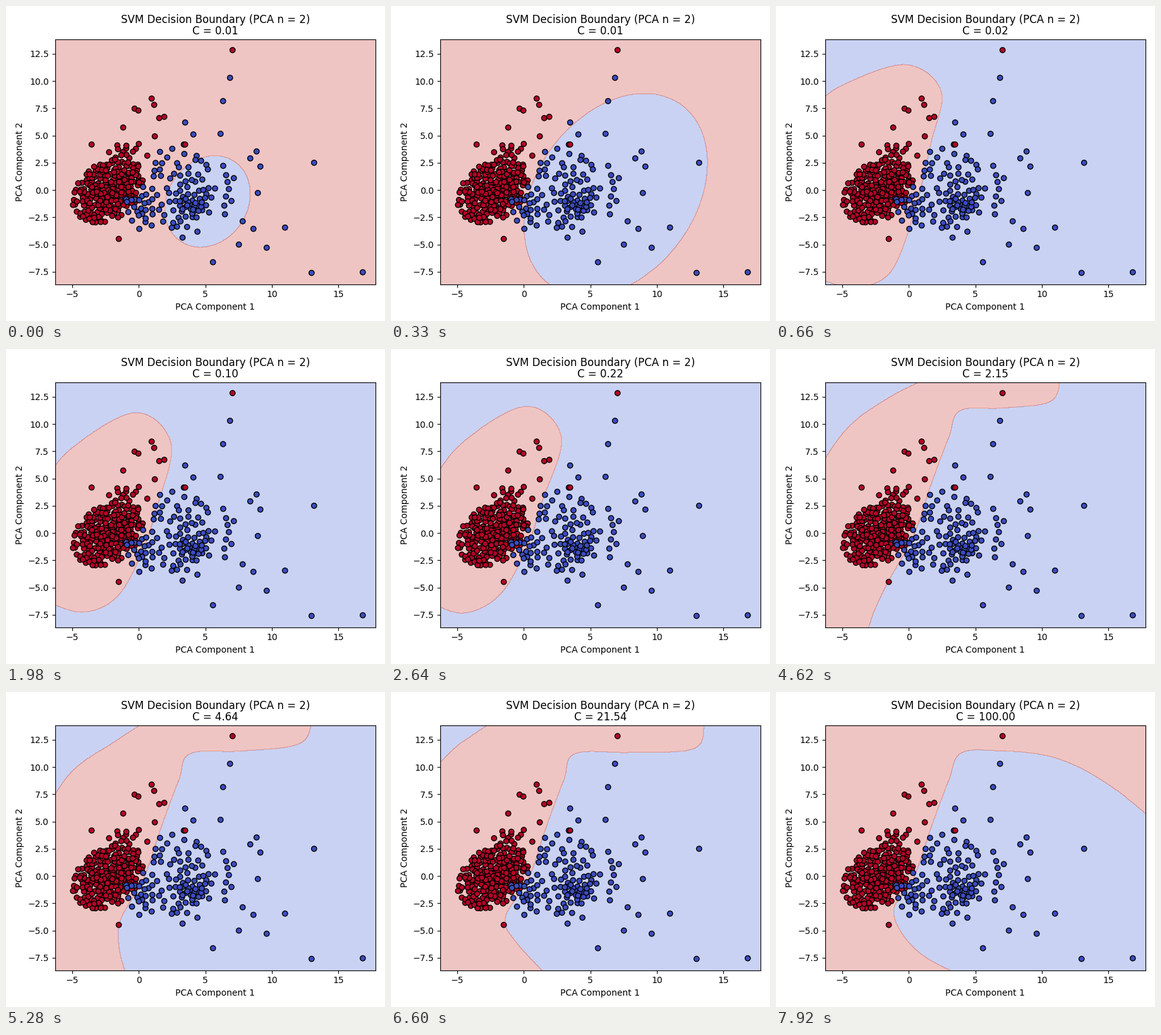
These frames come from a looping animation (600x500 px, 8.25 s). A matplotlib script:

```python
import numpy as np
import matplotlib.pyplot as plt
from matplotlib.animation import FuncAnimation
from matplotlib.path import Path

FRAMES, INTERVAL = 25, 330
RED, BLUE = "#b40426", "#3b4cc0"
XLIM, YLIM = (-6.29, 17.79), (-8.65, 13.80)
X0, Y0, SX, SY = 210.7, 292.3, 21.05, 17.32  # stage pixels <-> axis units
HEADING = "SVM Decision Boundary (PCA n = 2)\nC = {:.2f}"

rng = np.random.default_rng(11)


# ---- points -------------------------------------------------------------

def scatter_cloud(pts, n, center, radius, lean=0.0, tries=4):
    """Add n points of a cut-off normal cloud, each the loneliest of a few."""
    for _ in range(n):
        options = []
        while len(options) < tries:
            u, v = rng.normal(scale=0.5, size=2)
            if u * u + v * v < 1:
                options.append((center[0] + radius[0] * u,
                                center[1] + radius[1] * (v + lean * u)))
        placed = np.array(pts)
        pts.append(max(options, key=lambda p: np.hypot(*(placed - p).T).min()))


red = [(359, 70), (231, 147), (235, 157), (204, 163), (210, 166), (243, 178),
       (251, 176), (186, 193), (236, 207), (284, 220), (136, 220), (179, 370)]
scatter_cloud(red, 14, (195, 232), (42, 14))
scatter_cloud(red, 225, (162, 293), (56, 50), lean=-0.35)

blue = [(355, 114), (344, 151), (284, 185), (340, 203), (297, 204), (387, 242),
        (397, 231), (403, 255), (488, 249), (399, 297), (375, 342), (392, 354),
        (442, 352), (369, 379), (413, 384), (328, 407), (484, 424), (565, 423)]
scatter_cloud(blue, 72, (278, 292), (56, 80))
scatter_cloud(blue, 20, (297, 316), (24, 20))
scatter_cloud(blue, 22, (216, 322), (30, 38))
scatter_cloud(blue, 9, (350, 295), (16, 45))

# ---- decision regions ---------------------------------------------------

xs, ys = np.linspace(*XLIM, 500), np.linspace(*YLIM, 500)
GX, GY = np.meshgrid(X0 + xs * SX, Y0 - ys * SY)
GRID = np.column_stack([GX.ravel(), GY.ravel()])

# Red lobe, from its upper left end clockwise to the lower left.
LOBE = {
    2: [(50, 167), (105, 126), (205, 93), (262, 135), (246, 218), (217, 336),
        (180, 425), (120, 446), (50, 428)],
    6: [(50, 225), (105, 157), (205, 101), (262, 150), (240, 250), (213, 330),
        (175, 395), (120, 418), (50, 396)],
    11: [(50, 250), (120, 142), (225, 76), (283, 125), (240, 230), (218, 298),
         (170, 383), (106, 422), (50, 400)],
}
# Red band: four points upper left, three at the right end, three at the foot.
BAND = {
    12: [(50, 243), (125, 133), (190, 76), (290, 46), (372, 38), (371, 84),
         (330, 94), (171, 385), (106, 425), (40, 408)],
    16: [(50, 210), (103, 128), (172, 79), (235, 38), (488, 38), (465, 82),
         (370, 94), (182, 362), (180, 408), (194, 460)],
    20: [(50, 142), (98, 92), (130, 68), (175, 38), (498, 38), (482, 89),
         (380, 96), (182, 357), (196, 394), (258, 462)],
}
SEAM = [(292, 98), (274, 140), (246, 216), (218, 297)]
BASIN = ([(620, 222), (525, 146), (440, 104), (345, 93)] + SEAM
         + [(187, 350), (225, 412), (312, 460)])


def spline(pts, n=16):
    """Open Catmull-Rom curve."""
    p = np.asarray(pts, float)
    p = np.vstack([2 * p[0] - p[1], p, 2 * p[-1] - p[-2]])
    t = np.linspace(0, 1, n)[:, None]
    return np.vstack([
        0.5 * (2 * b + (c - a) * t + (2 * a - 5 * b + 4 * c - d) * t ** 2
               + (3 * b - a - 3 * c + d) * t ** 3)
        for a, b, c, d in zip(p, p[1:], p[2:], p[3:])])


def tween(keys, i):
    """Key points at step i; the first stretch slows down towards its end."""
    steps = sorted(keys)
    j = int(np.clip(np.searchsorted(steps, i, "right") - 1, 0, len(steps) - 2))
    a, b = steps[j], steps[j + 1]
    t = (i - a) / (b - a)
    if j == 0:
        t = 1 - (1 - t) ** 1.7
    p, q = np.array(keys[a], float), np.array(keys[b], float)
    return p + (q - p) * t


def bubble(t):
    """Blue egg that grows with t."""
    a = np.linspace(0, 2 * np.pi, 200)
    x = 319.5 + 36.5 * t + (67.5 + 77.5 * t) * np.cos(a)
    y = 310.5 - 10.5 * t - (72.5 + 88.5 * t) * np.sin(a + 0.17 + 0.15 * t)
    return np.column_stack([x, y])


def band(i):
    p = tween(BAND, i)
    right = np.vstack([p[4:7], SEAM, p[7:]])
    return np.vstack([spline(p[:4]), spline(right), [(40, p[-1, 1])]])


def basin(t):
    """Blue basin whose right rim sinks and whose foot spreads with t."""
    p = np.array(BASIN, float)
    x, y = p.T
    rim = 0.00104 * np.maximum(x - 345, 0) ** 2
    foot = 0.25 * np.maximum(y - 350, 0) * (x < 345)
    p -= (1 - t) * np.column_stack([foot, rim])
    return np.vstack([spline(p), [(620, 462)]])


def red_mask(i):
    if i < 2:
        outline, holds_red = bubble(i), False
    elif i < 12:
        outline, holds_red = spline(tween(LOBE, i)), True
    elif i < 22:
        outline, holds_red = band(i), True
    else:
        outline, holds_red = basin((i - 22) / 2), False
    inside = Path(outline).contains_points(GRID).reshape(GX.shape)
    return inside == holds_red


# ---- figure -------------------------------------------------------------

fig, ax = plt.subplots(figsize=(6, 5), dpi=100)
pts = np.array(red[12:] + blue + red[:12])
colors = [RED] * len(red[12:]) + [BLUE] * len(blue) + [RED] * 12
ax.scatter((pts[:, 0] - X0) / SX, (Y0 - pts[:, 1]) / SY, c=colors,
           edgecolors="k", zorder=1)
ax.set(xlim=XLIM, ylim=YLIM, xlabel="PCA Component 1", ylabel="PCA Component 2")
title = ax.set_title(HEADING.format(0.01), linespacing=1.02)
fig.tight_layout()
fig.subplots_adjust(top=0.8934)
C_VALUES = np.logspace(-2, 2, FRAMES)
shown = []


def draw(i):
    while shown:
        shown.pop().remove()
    shown.append(ax.contourf(xs, ys, red_mask(i).astype(float), alpha=0.3,
                             cmap="coolwarm", zorder=0))
    ax.set(xlim=XLIM, ylim=YLIM)
    title.set_text(HEADING.format(C_VALUES[i]))
    return [title]


anim = FuncAnimation(fig, draw, frames=FRAMES, init_func=lambda: draw(0),
                     interval=INTERVAL, repeat=True, repeat_delay=0, blit=False)
plt.show()
```
